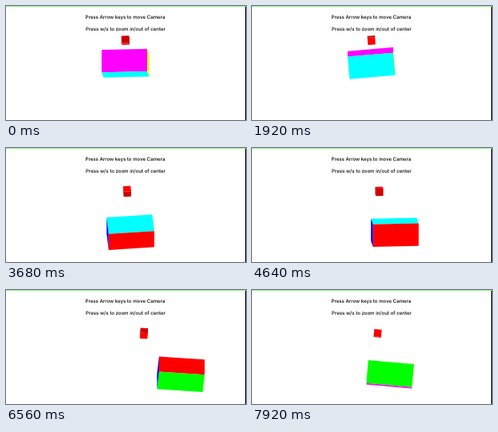
Write an HTML page that moves like this. It is 301x143 px and loops after 8000 ms.

```html
<!DOCTYPE html>
<html lang="en">
<head>
<meta charset="utf-8">
<title>Camera demo</title>
<style>
  html, body { margin: 0; width: 100%; height: 100%; overflow: hidden; background: #fff; }
  svg { display: block; width: 100vw; height: 100vh; }
  text {
    font: 500 6.1px Inter, "Liberation Sans", sans-serif;
    text-anchor: middle;
    text-rendering: geometricPrecision;
  }
</style>
</head>
<body>
<svg viewBox="0 0 301 143">
  <rect width="301" height="1" fill="#8cf58c"/>
  <rect x="300" y="1" width="1" height="142"/>
  <text x="149.5" y="16">Press Arrow keys to move Camera</text>
  <text x="150" y="31">Press w/s to zoom in/out of center</text>
  <g id="scene"></g>
</svg>
<script>
const LOOP = 8000, STEP = 80;
const YAW = 5 * Math.PI / 180;

// Camera shift: [ms, px]
const PAN_X = [[0, 0], [3360, 0], [3520, 3], [4400, 21], [4640, 29.3], [5280, 49.5],
  [5760, 67], [6000, 76], [6160, 74], [6560, 69.5], [7040, 56], [7920, 23.5]];
const PAN_Y = [[0, 0], [2290, 0], [2720, 14], [3320, 34], [8000, 34]];

// Faces: axis, side, colour
const faces = (front, bottom, back, top, left, right) => [
  [2, 1, front], [1, 1, bottom], [2, -1, back], [1, -1, top], [0, -1, left], [0, 1, right]];

const boxes = [
  { x: 149.8, y: 43, size: [9.4, 9.4, 9.4], depth: 1 / 3,
    faces: faces('#c80000', '#f00', '#d00000', '#f00', '#900000', '#900000') },
  { x: 149.8, y: 71.7, size: [57.5, 29, 29], depth: 1,
    faces: faces('#f0f', '#0ff', '#f00', '#0f0', '#00f', '#ff0') }
];

const scene = document.getElementById('scene');
for (const box of boxes) {
  box.nodes = box.faces.map(([, , fill]) => {
    const node = document.createElementNS('http://www.w3.org/2000/svg', 'polygon');
    node.setAttribute('fill', fill);
    return scene.appendChild(node);
  });
}

function sample(track, t) {
  let i = 1;
  while (i < track.length - 1 && track[i][0] < t) i++;
  const [t0, a] = track[i - 1], [t1, b] = track[i];
  return a + (b - a) * (t - t0) / (t1 - t0);
}

function rotate([x, y, z], pitch) {
  const c = Math.cos(pitch), s = Math.sin(pitch);
  const depth = x * Math.sin(YAW) + z * Math.cos(YAW);
  return [x * Math.cos(YAW) - z * Math.sin(YAW), y * c - depth * s, y * s + depth * c];
}

function corners(axis, side, size) {
  const u = (axis + 1) % 3, v = (axis + 2) % 3;
  return [[-1, -1], [1, -1], [1, 1], [-1, 1]].map(([a, b]) => {
    const p = [];
    p[axis] = side * size[axis] / 2;
    p[u] = a * size[u] / 2;
    p[v] = b * size[v] / 2;
    return p;
  });
}

function draw(t) {
  const pitch = (13 + 32.9 * t / 1000) * Math.PI / 180;
  const panX = sample(PAN_X, t), panY = sample(PAN_Y, t);
  for (const box of boxes) {
    const cx = box.x + panX * box.depth, cy = box.y + panY * box.depth;
    box.faces.forEach(([axis, side], i) => {
      const normal = [0, 0, 0];
      normal[axis] = side;
      const visible = rotate(normal, pitch)[2] > 0;
      const node = box.nodes[i];
      node.setAttribute('visibility', visible ? 'visible' : 'hidden');
      if (!visible) return;
      node.setAttribute('points', corners(axis, side, box.size).map(p => {
        const [x, y] = rotate(p, pitch);
        return (cx + x).toFixed(2) + ',' + (cy + y).toFixed(2);
      }).join(' '));
    });
  }
}

const start = performance.now();
function tick() {
  const t = (performance.now() - start) % LOOP;
  draw(Math.floor(t / STEP) * STEP);
  requestAnimationFrame(tick);
}
tick();
</script>
</body>
</html>
```
